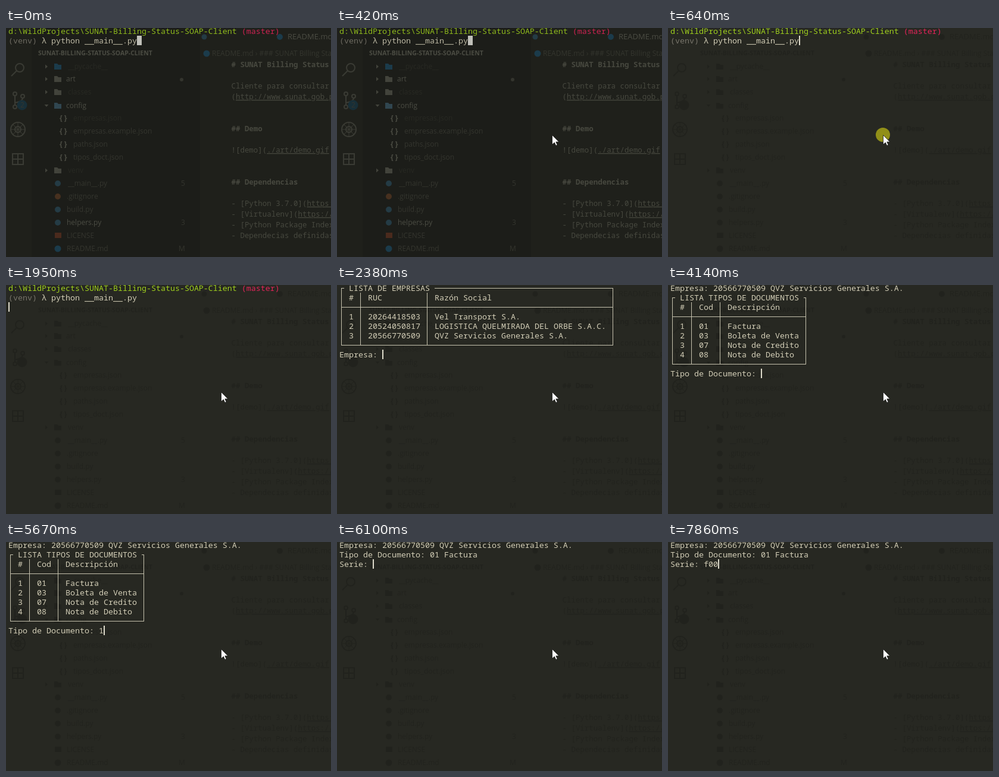
An HTML page that plays this animation: 546x386 px, repeating every 8 s.

```html
<!DOCTYPE html>
<html lang="es">
<head>
<meta charset="utf-8">
<title>Terminal</title>
<style>
  html, body { margin: 0; width: 100%; height: 100%; overflow: hidden; background: #272822; }
  svg { display: block; width: 546px; height: 386px; }
  text { white-space: pre; }

  .term { font: 13.333px "Noto Sans Mono", "DejaVu Sans Mono", monospace; fill: #d2cdb6; }
  .lines { fill: none; stroke: #c6c2ae; shape-rendering: crispEdges; }
  .path { fill: #9fcf1e; }
  .branch { fill: #e5245a; }
  .env { fill: #77746a; }

  .side { font: 12px "Open Sans", sans-serif; fill: #34352e; }
  .side .lit { fill: #4b4c43; }
  .side .low { fill: #282923; }
  .code { font: 12.45px "Noto Sans Mono", "DejaVu Sans Mono", monospace; fill: #47483f; }
  .icons { fill: none; stroke: #3a3b34; stroke-width: 2; }

  /* Everything runs on one 8 s clock: 1% = 80 ms. */
  .term, .unfocused, .ghost, .prompt, .click, .mouse, .block, .caret,
  .companies, .docs, .pick, .docPick, .serie, .head, .k1, .k2, .k3 {
    animation: 8s step-end infinite;
  }
  .term { animation-name: focus; }
  .unfocused, .block { animation-name: unfocused; }
  .ghost { animation-name: fade; }
  .prompt { animation-name: prompt; }
  .click { animation-name: click; }
  .mouse { animation-name: mouse; }
  .caret { animation-name: caret; }
  .companies { animation-name: companies; }
  .pick { animation-name: pick; }
  .head { animation-name: head; }
  .docs { animation-name: docs; }
  .docPick { animation-name: docPick; }
  .serie { animation-name: serie; }
  .k1 { animation-name: k1; }
  .k2 { animation-name: k2; }
  .k3 { animation-name: k3; }

  @keyframes focus { 0% { opacity: .88 } 8%, 100% { opacity: 1 } }
  @keyframes unfocused { 0% { opacity: 1 } 8%, 100% { opacity: 0 } }
  @keyframes fade {
    0% { filter: none; opacity: 1 }
    8%, 100% { filter: brightness(0); opacity: .13 }
  }
  @keyframes prompt { 0% { opacity: 1 } 29.75%, 100% { opacity: 0 } }
  @keyframes companies { 0% { opacity: 0 } 29.75% { opacity: 1 } 51.75%, 100% { opacity: 0 } }
  @keyframes pick { 0% { opacity: 0 } 46.25%, 100% { opacity: 1 } }
  @keyframes head { 0% { opacity: 0 } 51.75%, 100% { opacity: 1 } }
  @keyframes docs { 0% { opacity: 0 } 51.75% { opacity: 1 } 76.25%, 100% { opacity: 0 } }
  @keyframes docPick { 0% { opacity: 0 } 70.875%, 100% { opacity: 1 } }
  @keyframes serie { 0% { opacity: 0 } 76.25%, 100% { opacity: 1 } }
  @keyframes k1 { 0% { opacity: 0 } 88.75%, 100% { opacity: 1 } }
  @keyframes k2 { 0% { opacity: 0 } 94.125%, 100% { opacity: 1 } }
  @keyframes k3 { 0% { opacity: 0 } 98.25%, 100% { opacity: 1 } }

  @keyframes click { 0% { opacity: 0 } 8% { opacity: 1 } 10.875%, 100% { opacity: 0 } }
  @keyframes mouse {
    0% { opacity: 0; transform: translate(442px, 347px) }
    1.25% { opacity: 1; transform: translate(442px, 347px) }
    2.625% { opacity: 1; transform: translate(412px, 285px) }
    3.875% { opacity: 1; transform: translate(380px, 220px) }
    5.25%, 100% { opacity: 1; transform: translate(361px, 180px) }
  }
  @keyframes caret {
    0% { opacity: 0; transform: translate(220px, 13px) }
    8% { opacity: 1; transform: translate(220px, 13px) }
    14.75% { opacity: 0; transform: translate(220px, 13px) }
    21.625% { opacity: 1; transform: translate(220px, 13px) }
    24.375% { opacity: 1; transform: translate(4px, 29px) }
    29.75% { opacity: 1; transform: translate(76px, 109px) }
    36.625% { opacity: 0; transform: translate(76px, 109px) }
    43.5% { opacity: 1; transform: translate(76px, 109px) }
    46.25% { opacity: 1; transform: translate(84px, 109px) }
    50.25% { opacity: 1; transform: translate(4px, 125px) }
    51.75% { opacity: 1; transform: translate(156px, 141px) }
    58.625% { opacity: 0; transform: translate(156px, 141px) }
    65.25% { opacity: 1; transform: translate(156px, 141px) }
    70.875% { opacity: 1; transform: translate(164px, 141px) }
    76.25% { opacity: 1; transform: translate(60px, 29px) }
    83.125% { opacity: 0; transform: translate(60px, 29px) }
    88.75% { opacity: 1; transform: translate(68px, 29px) }
    94.125% { opacity: 1; transform: translate(76px, 29px) }
    98.25%, 100% { opacity: 1; transform: translate(84px, 29px) }
  }
</style>
</head>
<body>
<svg viewBox="0 0 546 386">
  <defs>
    <path id="folder" d="M-6 -5h5l2 2h5v8h-12z"/>
    <path id="arrow" d="M-2 -3.5l4 3.5-4 3.5z"/>
  </defs>

  <g class="unfocused">
    <rect width="546" height="386" fill="#1f201b"/>
    <rect x="43" width="283" height="386" fill="#1c1d19"/>
  </g>

  <!-- editor window showing through the terminal -->
  <g class="ghost">
    <g class="icons">
      <circle cx="23" cy="67" r="7"/><path d="M18 72l-9 9"/>
      <circle cx="15" cy="111" r="3"/><circle cx="28" cy="115" r="3"/><circle cx="15" cy="133" r="3"/>
      <path d="M15 114v16M28 118q0 6-13 8"/>
      <circle cx="20" cy="171" r="12"/><circle cx="20" cy="171" r="5"/>
      <path d="M20 159v24M8 171h24M12 163l16 16M28 163l-16 16" stroke-width="1"/>
      <path d="M11 212h18v18h-18zM20 212v18M11 221h18"/>
    </g>
    <circle cx="27" cy="130" r="8.5" fill="#182f38"/>
    <text class="side" x="24" y="134" font-size="10">2</text>

    <g class="side">
      <text class="lit" x="54" y="46" style="font-size:10.5px;font-weight:700">SUNAT-BILLING-STATUS-SOAP-CLIENT</text>
      <g fill="#42433b">
        <use href="#arrow" x="68" y="65"/><use href="#arrow" x="68" y="86"/>
        <use href="#arrow" x="68" y="108"/><use href="#arrow" x="68" y="240"/>
        <path d="M64.500 129h7l-3.500 4z"/>
        <use href="#folder" x="87" y="86"/><use href="#folder" x="87" y="108"/><use href="#folder" x="87" y="240"/>
      </g>
      <use href="#folder" x="87" y="65" fill="#1b3b4b"/>
      <use href="#folder" x="87" y="131" fill="#304650"/>
      <text class="low" x="104" y="69">__pycache__</text>
      <text class="lit" x="101" y="90">art</text>
      <circle cx="295" cy="87" r="3" fill="#34352e"/>
      <text class="low" x="104" y="112">classes</text>
      <text class="lit" x="101" y="135">config</text>
      <g class="lit" style="font-weight:700">
        <text x="90" y="156">{ }</text><text x="90" y="178">{ }</text>
        <text x="90" y="200">{ }</text><text x="90" y="222">{ }</text>
      </g>
      <text class="low" x="113" y="156">empresas.json</text>
      <text x="113" y="178">empresas.example.json</text>
      <text x="113" y="200">paths.json</text>
      <text x="113" y="222">tipos_doct.json</text>
      <text class="low" x="104" y="244">venv</text>
      <g fill="#243b45">
        <circle cx="87" cy="262" r="5"/><circle cx="87" cy="306" r="5"/><circle cx="87" cy="328" r="5"/>
      </g>
      <circle cx="87" cy="284" r="5" fill="#47301f"/>
      <rect x="82" y="345" width="11" height="9" fill="#4a2a1d"/>
      <circle cx="87" cy="372" r="5.500" fill="#1b3b4b"/>
      <text x="104" y="266">__main__.py</text><text x="294" y="266">5</text>
      <text x="102" y="288">.gitignore</text>
      <text x="102" y="310">build.py</text>
      <text class="lit" x="102" y="332">helpers.py</text><text x="294" y="332">3</text>
      <text x="102" y="354">LICENSE</text>
      <text x="102" y="376">README.md</text><text x="290" y="376">M</text>
      <circle cx="333" cy="15" r="4.500" fill="#243b45"/>
      <circle cx="460" cy="15" r="5" fill="#1b3b4b"/>
      <text class="lit" x="473" y="19" style="font-size:13px">README.md</text>
      <circle cx="337" cy="43" r="5.500" fill="#1b3b4b"/>
      <text x="346" y="47">README.md › ### SUNAT Billing Status</text>
    </g>

    <g class="code">
      <text x="378.500" y="66" font-weight="600"># SUNAT Billing Status</text>
      <text x="378.500" y="102">Cliente para consultar</text>
      <text x="378.500" y="120">(<tspan text-decoration="underline">http://www.sunat.gob.p</tspan></text>
      <text x="378.500" y="174" font-weight="600">## Demo</text>
      <text x="378.500" y="210">![demo](<tspan text-decoration="underline">./art/demo.gif</tspan></text>
      <text x="378.500" y="264" font-weight="600">## Dependencias</text>
      <text x="378.500" y="300">- [Python 3.7.0](<tspan text-decoration="underline">https:</tspan></text>
      <text x="378.500" y="318">- [Virtualenv](<tspan text-decoration="underline">https://</tspan></text>
      <text x="378.500" y="336">- [Python Package Index</text>
      <text x="378.500" y="354">- Dependecias definidas</text>
    </g>
  </g>

  <g class="term">
    <g class="prompt">
      <text class="path" x="4" y="10">d:\WildProjects\SUNAT-Billing-Status-SOAP-Client <tspan class="branch">(master)</tspan></text>
      <text x="4" y="26"><tspan class="env">(venv)</tspan> λ python __main__.py</text>
    </g>

    <g class="companies">
      <path class="lines" d="M12 5.500H7.500V101.500H463.500V5.500H164M7.500 37.500H463.500M39.500 13V101.500M151.500 13V101.500"/>
      <text x="20" y="10">LISTA DE EMPRESAS</text>
      <text x="20" y="26">#</text><text x="52" y="26">RUC</text><text x="164" y="26">Razón Social</text>
      <text x="20" y="58">1</text><text x="52" y="58">20264418503</text><text x="164" y="58">Vel Transport S.A.</text>
      <text x="20" y="74">2</text><text x="52" y="74">20524050817</text><text x="164" y="74">LOGISTICA QUELMIRADA DEL ORBE S.A.C.</text>
      <text x="20" y="90">3</text><text x="52" y="90">20566770509</text><text x="164" y="90">QVZ Servicios Generales S.A.</text>
      <text x="4" y="122">Empresa:</text><text class="pick" x="76" y="122">3</text>
    </g>

    <text class="head" x="4" y="10">Empresa: 20566770509 QVZ Servicios Generales S.A.</text>

    <g class="docs">
      <path class="lines" d="M12 21.500H7.500V133.500H231.500V21.500H228M7.500 53.500H231.500M39.500 29V133.500M87.500 29V133.500"/>
      <text x="20" y="26">LISTA TIPOS DE DOCUMENTOS</text>
      <text x="20" y="42">#</text><text x="52" y="42">Cod</text><text x="100" y="42">Descripción</text>
      <text x="20" y="74">1</text><text x="52" y="74">01</text><text x="100" y="74">Factura</text>
      <text x="20" y="90">2</text><text x="52" y="90">03</text><text x="100" y="90">Boleta de Venta</text>
      <text x="20" y="106">3</text><text x="52" y="106">07</text><text x="100" y="106">Nota de Credito</text>
      <text x="20" y="122">4</text><text x="52" y="122">08</text><text x="100" y="122">Nota de Debito</text>
      <text x="4" y="154">Tipo de Documento:</text><text class="docPick" x="156" y="154">1</text>
    </g>

    <g class="serie">
      <text x="4" y="26">Tipo de Documento: 01 Factura</text>
      <text x="4" y="42">Serie:</text>
      <text class="k1" x="60" y="42">f</text><text class="k2" x="68" y="42">0</text><text class="k3" x="76" y="42">0</text>
    </g>

    <rect class="block" x="220" y="13" width="8" height="16" fill="#d8d8d0"/>
    <rect class="caret" width="2" height="16" fill="#dedbcb"/>
  </g>

  <circle class="click" cx="361" cy="180" r="12" fill="#918f18"/>
  <path class="mouse" d="M.5 .5V16.500L4.300 13 6.800 18.300 9.200 17.200 6.800 12H11.800Z" fill="#fff" stroke="#1a1a18" stroke-width=".8"/>
</svg>
</body>
</html>
```
